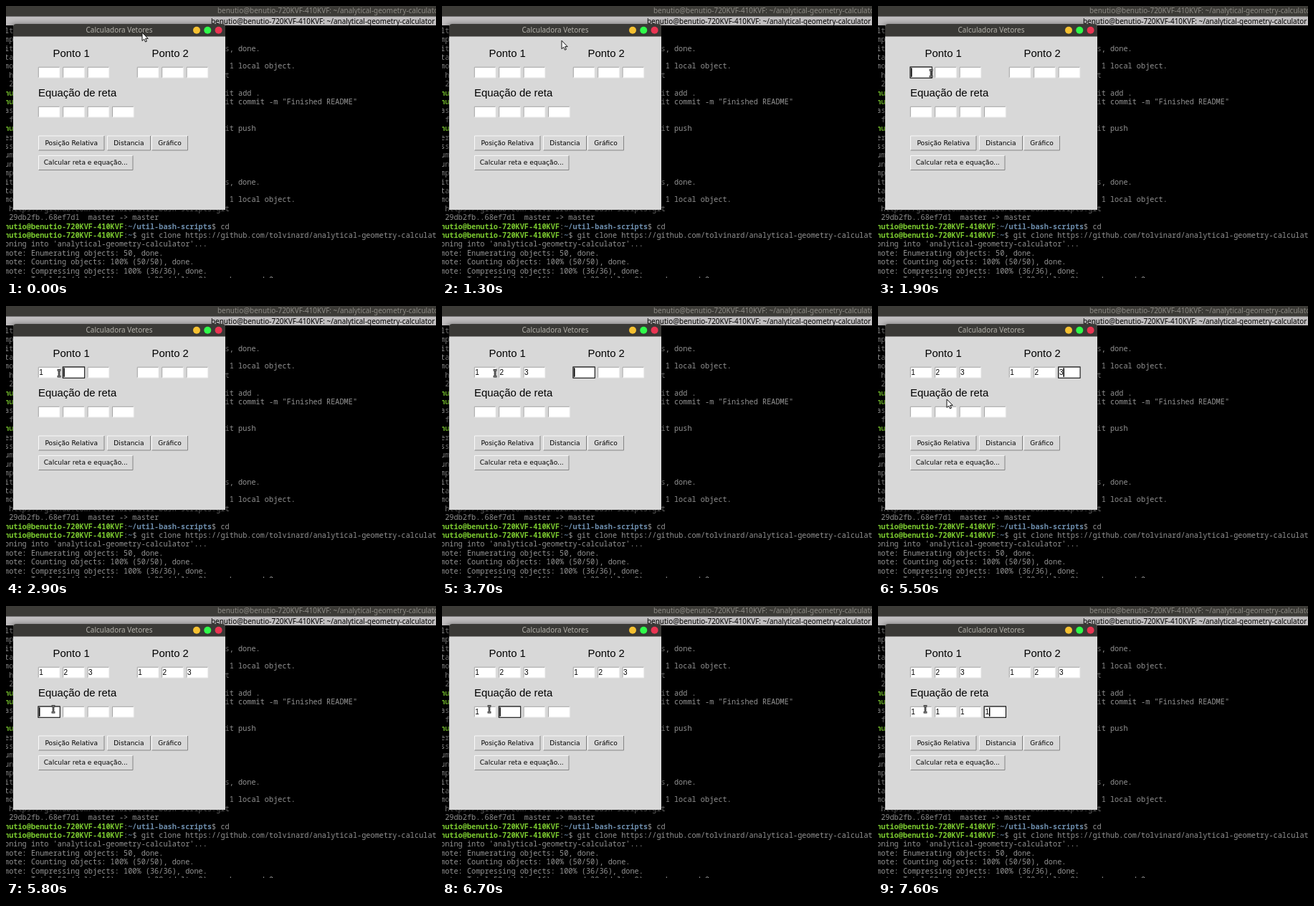
An HTML page that plays this animation: 600 px wide and 379 px high, repeating every 8000 ms.

```html
<!DOCTYPE html>
<html lang="pt">
<head>
<meta charset="utf-8">
<title>Calculadora Vetores</title>
<style>
  html, body { margin: 0; width: 100%; height: 100%; overflow: hidden; background: #000; }
  svg { display: block; width: 100%; height: 100%; }
  text { white-space: pre; }
  .term { font: 10.25px "Noto Sans Mono", "DejaVu Sans Mono", monospace; fill: #929292; }
  .user { font-weight: 700; fill: #7ccb30; }
  .path { font-weight: 700; fill: #6c8cab; }
  .bar { font: 9.95px "Noto Sans", "Open Sans", sans-serif; }
  .label { font: 14.9px "Liberation Sans", Arial, sans-serif; }
  .digit { font: 10px "Liberation Sans", Arial, sans-serif; }
  .button { font: 9.1px "DejaVu Sans", sans-serif; }
  .middle { text-anchor: middle; }
</style>
</head>
<body>
<svg id="stage" viewBox="0 0 600 379">
  <defs>
    <filter id="blur" x="-20%" y="-20%" width="140%" height="140%"><feGaussianBlur stdDeviation="5"/></filter>
  </defs>
</svg>
<script>
const LOOP = 8000, STEP = 100;
const stage = document.getElementById('stage');

function add(tag, attrs, parent = stage) {
  const node = document.createElementNS('http://www.w3.org/2000/svg', tag);
  for (const key in attrs) node.setAttribute(key, attrs[key]);
  return parent.appendChild(node);
}
const rect = (x, y, width, height, fill, extra) => add('rect', { x, y, width, height, fill, ...extra });
function text(x, y, cls, content, fill = '#000') {
  const node = add('text', { x, y, class: cls, fill });
  node.textContent = content;
  return node;
}

// Terminal
const USER = 'benutio', HOST = USER + '-720KVF-410KVF';
const REPO = 'https://github.com/tolvinard/';
const prompt = (path, command) => [['user', `${USER}@${HOST}`.slice(2)], ['', ':'], ['path', path], ['', '$ ' + command]];
const scripts = command => prompt('~/util-bash-scripts', command);
const pushed = [
  'iting objects: 100% (3/3), 301 bytes | 301.00 KiB/s, done.',
  'tal 3 (delta 1), reused 0 (delta 0)',
  'mote: Resolving deltas: 100% (1/1), completed with 1 local object.',
  ` ${REPO}util-bash-scripts.git`,
  ' 29db2fb..68ef7d1  master -> master'
];
const lines = [
  'lta compression using up to 8 threads',
  'mpressing objects: 100% (3/3), done.',
  ...pushed,
  scripts('git add .'),
  scripts('git commit -m "Finished README"'),
  'aster 68ef7d1] Finished README',
  ' file changed, 1 insertion(+)',
  scripts('git push'),
  "ername for 'https://github.com':",
  "ssword for 'https://github.com':",
  'umerating objects: 5, done.',
  'unting objects: 100% (5/5), done.',
  'mpressing objects: 100% (3/3), done.',
  ...pushed,
  scripts('cd'),
  prompt('~', `git clone ${REPO}analytical-geometry-calculator`),
  "oning into 'analytical-geometry-calculator'...",
  'mote: Enumerating objects: 50, done.',
  'mote: Counting objects: 100% (50/50), done.',
  'mote: Compressing objects: 100% (36/36), done.',
  'mote: Total 50 (delta 16), reused 28 (delta 8), pack-reused 0'
];
rect(0, 0, 600, 379, '#000');
lines.forEach((line, i) => {
  const row = add('text', { x: -2, y: 37.8 + i * 12.4, class: 'term' });
  for (const [cls, part] of typeof line === 'string' ? [['', line]] : line)
    add('tspan', { class: cls }, row).textContent = part;
});
const heading = `${USER}@${HOST}: ~/analytical-geometry-calculator`;
rect(0, 0, 600, 14.5, '#3c3b37');
rect(0, 14.5, 600, 12.5, '#c0bebf');
text(295, 10, 'bar', heading, '#8d8b85');
text(286, 24.5, 'bar', heading);

// Calculator window
rect(8, 27, 300, 260, '#000', { opacity: .65, filter: 'url(#blur)' });
add('path', { d: 'M10 284V29q0-4 4-4H302q4 0 4 4V284Z', fill: '#d8d8d8' });
add('path', { d: 'M10 42.5V29q0-4 4-4H302q4 0 4 4V42.5Z', fill: '#3a3936' });
text(158, 37.3, 'bar middle', 'Calculadora Vetores', '#b5b3ac');
['#f5c030', '#2ffb4a', '#ea3452'].forEach((fill, i) =>
  add('circle', { cx: 266 + i * 15.3, cy: 33.7, r: 5, fill }));

text(65.5, 71.2, 'label', 'Ponto 1');
text(203.5, 71.2, 'label', 'Ponto 2');
text(45, 126.4, 'label', 'Equação de reta');

function bevel(x, y, w, h, light, dark) {
  add('path', { d: `M${x} ${y + h}V${y}H${x + w}`, fill: 'none', stroke: light });
  add('path', { d: `M${x} ${y + h}H${x + w}V${y}`, fill: 'none', stroke: dark });
}
function button(x, y, w, label) {
  bevel(x + .5, y + .5, w - 1, 20, '#f8f8f8', '#858585');
  text(x + w / 2, y + 13.4, 'button middle', label);
}
button(45, 180.5, 92.5, 'Posição Relativa');
button(141, 180.5, 61, 'Distancia');
button(203, 180.5, 51, 'Gráfico');
button(45, 208, 132.5, 'Calcular reta e equação...');

// Each group is focused once, then its values are typed at a steady beat
const groups = [
  { x: 44, y: 84, values: '123', focus: 1800, type: 2600, beat: 350 },
  { x: 182, y: 84, values: '123', focus: 3700, type: 3900, beat: 400 },
  { x: 44, y: 139, values: '1111', focus: 5800, type: 6480, beat: 330 }
];
const toStep = t => Math.round(t / STEP) * STEP;
const entries = groups.flatMap(group => [...group.values].map((value, i) => {
  const x = group.x + i * 34.4, y = group.y;
  const typed = toStep(group.type + i * group.beat);
  rect(x + 1, y + 1, 30, 15, '#fff');
  bevel(x + 1.3, y + 1.3, 29.6, 14.6, '#a2a2a2', '#ededed');
  return {
    x, y, typed,
    focus: i ? typed - STEP : group.focus,
    ring: rect(x + .9, y + .9, 30.4, 15.4, 'none', { stroke: '#000' }),
    digit: text(x + 2.2, y + 12.1, 'digit', value),
    caret: rect(x, y + 2.3, 1.5, 12.5, '#000')
  };
}));

// Pointer shapes, with their hot spot at the origin
const arrow = add('path', { d: 'M0 0V11.5L2.7 9.1L4.5 13L6.4 12.2L4.6 8.4H8.2Z', fill: '#fff', stroke: '#111' });
const beam = add('g', {});
for (const [stroke, width] of [['#111', 2.6], ['#ccc', .7]])
  add('path', { d: 'M-2.4 -4.5H2.4M0 -4.5V4.5M-2.4 4.5H2.4', fill: 'none', stroke, 'stroke-width': width }, beam);

const stops = [
  { at: 1100, x: 190, y: 37 },
  { at: 1800, x: 74, y: 93.7 },
  { at: 5100, x: 74, y: 93.7 },
  { at: 5500, x: 96, y: 130 },
  { at: 5800, x: 66, y: 143.7 }
];
function pointer(t) {
  const next = stops.findIndex(stop => stop.at > t);
  if (next <= 0) return next ? stops[stops.length - 1] : stops[0];
  const a = stops[next - 1], b = stops[next];
  const p = (t - a.at) / (b.at - a.at), eased = p * p * (3 - 2 * p);
  return { x: a.x + (b.x - a.x) * eased, y: a.y + (b.y - a.y) * eased };
}

const show = (node, on) => node.setAttribute('visibility', on ? 'visible' : 'hidden');

function draw(t) {
  const active = entries.filter(entry => entry.focus <= t).pop();
  for (const entry of entries) {
    const typed = t >= entry.typed, focused = entry === active;
    entry.caret.setAttribute('x', entry.x + (typed ? 7.7 : 2));
    show(entry.digit, typed);
    show(entry.ring, focused);
    show(entry.caret, focused && (t - entry.focus) % 900 < 600);
  }
  const { x, y } = pointer(t);
  const overEntry = entries.some(e => x >= e.x && x <= e.x + 32 && y >= e.y && y <= e.y + 17);
  for (const node of [arrow, beam]) node.setAttribute('transform', `translate(${x} ${y})`);
  show(arrow, !overEntry);
  show(beam, overEntry);
}

const start = performance.now();
function tick() {
  const t = (performance.now() - start) % LOOP;
  draw(Math.floor(t / STEP) * STEP);
  requestAnimationFrame(tick);
}
tick();
</script>
</body>
</html>
```
